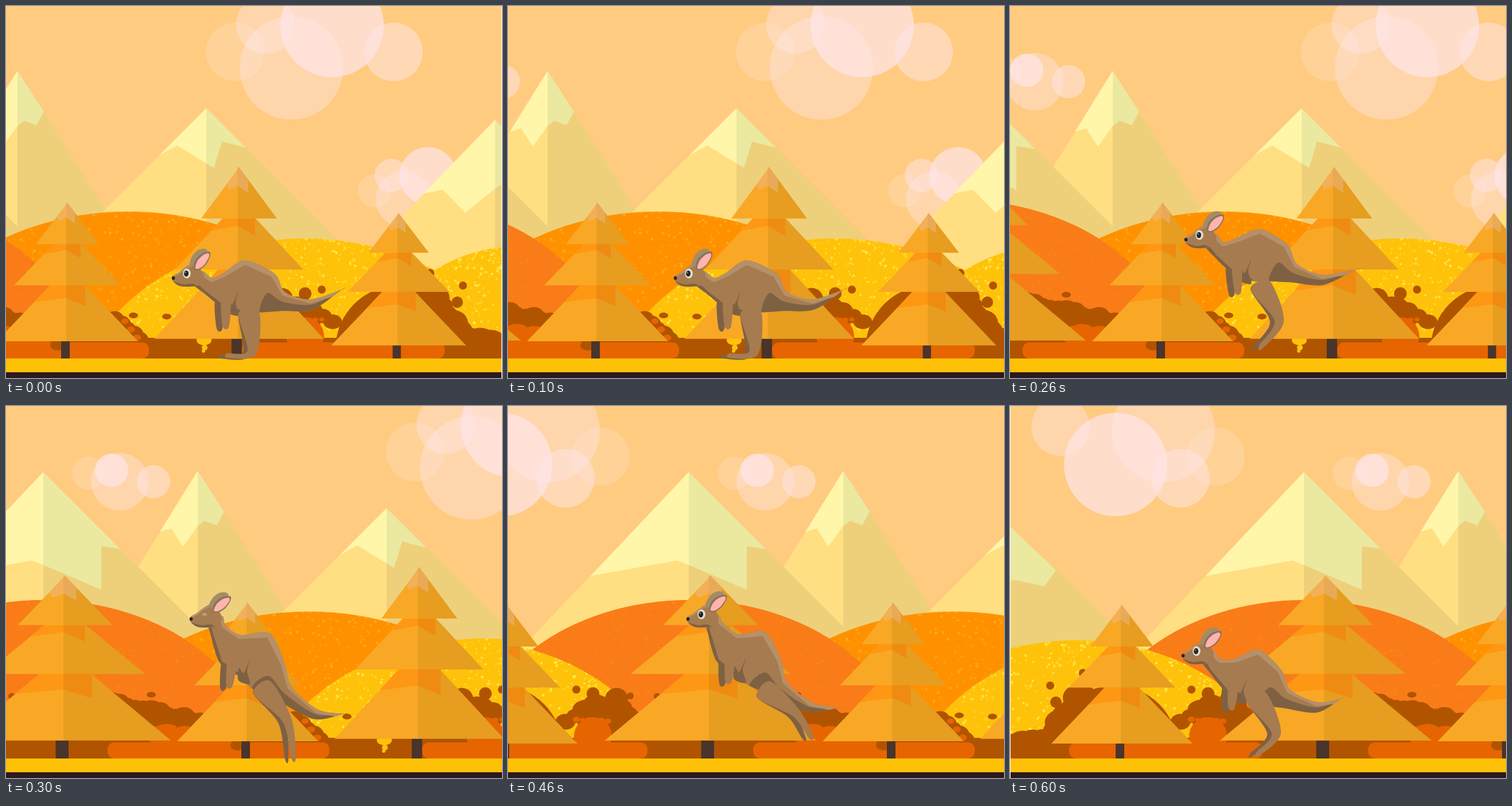
Write an HTML page with a canvas that moves like this. It is 864 px wide and 648 px high and loops after 0.7 s.

```html
<!DOCTYPE html>
<html lang="en">
<head>
<meta charset="utf-8">
<title>Kangaroo run</title>
<style>
html, body { margin: 0; width: 100%; height: 100%; overflow: hidden; background: #fff; }
#stage { position: relative; width: 864px; height: 648px; overflow: hidden; }
#world, #runner { position: absolute; left: 0; top: 0; }
</style>
</head>
<body>
<div id="stage">
  <canvas id="world" width="1624" height="648"></canvas>
  <svg id="runner" width="864" height="648" viewBox="0 0 864 648"></svg>
</div>
<script>
const LOOP = 700;
const SHIFTS = [-761, -712, -602, -447, -197, -158, 0];
const POSE_AT = [0, 0, 1, 2, 3, 4, 5];

const points = text => text.trim().split(/\s+/).map(p => p.split(',').map(Number));
const mix = (a, b, t) => a + (b - a) * t;

let seed = 7;
const random = () => (seed = (seed * 16807) % 2147483647) / 2147483647;

// ---------- scenery ----------
const c = document.getElementById('world').getContext('2d');
const GOLD = '#ffc20a', BROWN = '#b15400', RUST = '#e66500';

function poly(color, text) {
  c.fillStyle = color;
  c.beginPath();
  points(text).forEach(p => c.lineTo(...p));
  c.fill();
}

function dot(color, x, y, rx, ry = rx) {
  c.fillStyle = color;
  c.beginPath();
  c.ellipse(x, y, rx, ry, 0, 0, 7);
  c.fill();
}

const dots = (color, text) => points(text).forEach(p => dot(color, ...p));

function clouds() {
  const fog = a => `rgba(255,230,235,${a})`;
  dots(fog(.22), '1160,80,51 358,88,51 591,117,29 1403,322,29');
  dots(fog(.4), '1258,108,90 1213,32,51 267,43,90 88,36,51 645,132,50 1454,337,49');
  dots(fog(.5), '1436,80,51 297,126,51 704,132,29 1432,295,29');
  dots(fog(.7), '1329,34,90 184,102,90 631,112,29 1496,296,50');
}

// A lit and a shaded half; the snow line runs through the given points.
function mountain(x, y, base, runLeft, runRight, snowLeft, snowRight) {
  const drop = base - y, top = `${x},${y}`, foot = `${x},${base}`;
  poly('#ffdf82', `${top} ${x - drop * runLeft},${base} ${foot}`);
  poly('#eed07b', `${top} ${x + drop * runRight},${base} ${foot}`);
  poly('#fff6aa', `${top} ${snowLeft}`);
  poly('#ebe8a0', `${top} ${snowRight}`);
}

function mountains() {
  mountain(-70, 143, 428, 1, 1.05, '-70,300', '80,286 60,314 8,303 -70,320');
  mountain(781, 113, 414, .62, .635, '715,219 735,213 755,245 781,209', '827,184 814,208 793,200 781,209');
  mountain(512, 115, 444, .95, 1, '341,296 492,269 512,277', '646,249 613,244 613,320 512,277');
  mountain(1110, 178, 418, 1, 1, '1028,260 1059,243 1110,274', '1179,247 1137,236 1123,282 1110,274');
  mountain(1613, 198, 478, .96, 1, '1488,327 1522,320 1561,360 1613,318', '1640,225 1640,300 1613,318');
}

function hill(x, top, rx, ry, color, speck, strength) {
  c.save();
  c.beginPath();
  c.ellipse(x, top + ry, rx, ry, 0, 0, 7);
  c.clip();
  c.fillStyle = color;
  c.fillRect(x - rx, top, rx * 2, 612 - top);
  for (let i = 0; i < 1000; i++) {
    c.globalAlpha = strength * (.3 + random() * .7);
    dot(speck, mix(x - rx, x + rx, random()), top + random() ** 1.3 * 190, .9 + random() * 1.8);
  }
  c.restore();
}

function hills() {
  const gold = (...place) => hill(...place, GOLD, '#ffee58', .9);
  hill(974, 358, 420, 325, '#ff9100', '#ffb424', .8);
  hill(512, 338, 380, 285, '#f97c18', '#ff8f08', .55);
  gold(115, 408, 380, 310);
  gold(1280, 405, 400, 310);
  gold(1650, 419, 285, 310);
}

// Puffs of uneven size strung along a line.
function clump(color, x1, y1, x2, y2, r, n) {
  for (let i = 0; i < n; i++) {
    const t = i / (n - 1), size = r * (.75 + random() * .5);
    dot(color, mix(x1, x2, t), mix(y1, y2, t), size * 1.15, size * .9);
  }
}

function bar(color, x1, x2) {
  c.fillStyle = color;
  c.beginPath();
  c.roundRect(x1, 586, x2 - x1, 28, 12);
  c.fill();
}

// Big round bush with a smaller one beside it.
function thicket() {
  dots(BROWN, '182,597,110 127,465,7 70,487,7 80,516,10 316,494,7 345,501,11 386,511,20 410,505,6 360,548,42');
  clump(BROWN, 122, 508, 80, 566, 24, 5);
  clump(BROWN, 5, 590, 75, 574, 20, 5);
  clump(BROWN, 297, 550, 350, 520, 17, 4);
  clump(BROWN, 395, 525, 425, 560, 20, 4);
  dot(RUST, 345, 575, 33);
  clump(RUST, 316, 546, 371, 549, 5, 6);
}

function bushes() {
  c.fillStyle = BROWN;
  c.fillRect(0, 578, 1624, 40);
  clump(BROWN, 630, 512, 785, 545, 13, 12);
  clump(BROWN, 630, 530, 760, 556, 18, 9);
  clump(BROWN, 950, 544, 1010, 600, 15, 7);
  clump(BROWN, 945, 570, 985, 600, 26, 4);
  dots(BROWN, '700,503,8,5 983,539,8,5 1041,541,8,5 457,506,6');
  thicket();
  c.save();
  c.translate(1627, 0);
  c.scale(-1, 1);
  thicket();
  c.restore();

  bar(RUST, 103, 440);
  bar(RUST, 624, 1010);
  bar(RUST, 1172, 1525);
  clump(RUST, 712, 573, 820, 580, 20, 8);
  clump(RUST, 968, 549, 1000, 592, 6, 4);
  dots(BROWN, '851,591,13,9');
  dots(GOLD, '1106,582,13,9 1107,595,5 1105,601,3');
}

// One fir, drawn at unit size and scaled to its place.
function tree(x, y, sx, sy) {
  const halves = (left, right, lit, dim) => { poly(lit, left); poly(dim, right); };
  const tier = (top, base, half) => halves(
    `0,${top} ${-half},${base} 0,${base}`,
    `-2,${top + 2} 0,${top} ${half},${base} -2,${base}`, '#f9a825', '#e69d20');
  const shadow = (left, right) => halves(left, right, '#fe9714', '#ef8b10');
  const foot = (614 - y) / sy;
  c.save();
  c.translate(x, y);
  c.scale(sx, sy);
  poly('#4a342b', `-11,240 4,240 4,${foot} -11,${foot}`);
  tier(112, 241, 123);
  shadow('-30,143 -2,143 -2,166 -58,173', '-2,143 31,143 31,179 -2,166');
  tier(47, 143.5, 93);
  shadow('-24,72 -2,72 -2,82 -40,89', '-2,72 23,72 23,96 -2,82');
  tier(0, 72, 55);
  halves('0,0 -18,24 -15,32 -2,26 -2,0', '-2,2 0,0 13,17 13,36 -2,26', '#f3b058', '#e9aa57');
  c.restore();
}

function paintWorld() {
  c.fillStyle = '#ffcb80';
  c.fillRect(0, 0, 1624, 648);
  clouds();
  mountains();
  hills();
  bushes();
  tree(195, 347, 1, 1);
  tree(550, 296, 1.5, 1.19);
  tree(868, 343, 1, 1);
  tree(1167, 281, 1.2, 1.24);
  tree(1445, 361, .955, .955);
  c.fillStyle = '#ffc107';
  c.fillRect(0, 614, 1624, 24);
  c.fillStyle = '#2c1820';
  c.fillRect(0, 638, 1624, 10);
  c.clearRect(0, 0, .7, 648);
}

// ---------- kangaroo ----------
const FUR = '#a67b50', FUR_LIGHT = '#b59068', FUR_DARK = '#7e6143';

// Joints: eye, neck, shoulder, middle, rump, tail, tip, hip, heel, toe, hand.
const POSES = [
  '315,466 352,487 378,495 413,489 455,500 532,520 585,494 423,534 428,604 386,609 383,558',
  '330,399 364,424 390,434 428,434 467,447 545,477 602,459 436,487 469,549 437,594 397,498',
  '346,363 369,388 390,423 433,434 457,470 540,537 589,536 446,490 490,548 501,613 389,487',
  '337,363 360,383 382,421 422,432 448,464 525,524 575,526 446,494 502,535 528,577 384,480',
  '323,398 354,427 382,443 418,441 450,465 530,496 575,481 434,492 471,536 456,595 386,498',
  '325,427 357,452 384,469 420,469 453,490 535,525 576,510 430,508 464,570 432,606 386,526'
];
const CLOSED_EYE = 2;
const GIRTH = [13, 15, 30, 46, 36, 17, 9, 0];

const shift = ([x, y], dx, dy) => [x + dx, y + dy];

// Closed curve that runs softly through the given points.
function smooth(p) {
  const n = p.length, k = .15, at = i => p[(i + n) % n];
  let d = `M${p[0]}`;
  for (let i = 0; i < n; i++) {
    const [a, b, e, f] = [at(i - 1), at(i), at(i + 1), at(i + 2)];
    const near = b.map((v, j) => (v + (e[j] - a[j]) * k).toFixed(1));
    const far = e.map((v, j) => (v - (f[j] - b[j]) * k).toFixed(1));
    d += `C${near} ${far} ${e}`;
  }
  return d + 'Z';
}

// Both edges of a band of varying half-width around a chain of joints.
function band(chain, widths) {
  const edge = side => chain.map((p, i) => {
    const a = chain[Math.max(i - 1, 0)], b = chain[Math.min(i + 1, chain.length - 1)];
    const dx = b[0] - a[0], dy = b[1] - a[1], s = side * widths[i] / Math.hypot(dx, dy);
    return shift(p, dy * s, -dx * s);
  });
  const top = edge(1), bottom = edge(-1);
  return { top, bottom, outline: [...top, ...bottom.slice().reverse()] };
}

const shape = (pts, fill) => `<path d="${smooth(pts)}" fill="${fill}"/>`;
const sketch = (text, fill) => shape(points(text), fill);
const limb = (chain, widths, fill) => shape(band(chain, widths).outline, fill);
const oval = (x, y, rx, ry, fill) => `<ellipse cx="${x}" cy="${y}" rx="${rx}" ry="${ry}" fill="${fill}"/>`;
const line = (pts, color, width) =>
  `<polyline points="${pts}" fill="none" stroke="${color}" stroke-width="${width}" stroke-linejoin="round"/>`;

function head(eye, neck, closed) {
  const slope = Math.atan2(neck[1] - eye[1], neck[0] - eye[0]) * 180 / Math.PI;
  const ears = `<g transform="rotate(${(slope - 30) / 2})">` +
    sketch('5,-16 10,-31 20,-41 32,-43 36,-38 26,-33 17,-20 13,-13', '#a48c69') +
    sketch('13,-7 14,-22 25,-34 39,-38 41,-31 34,-16 23,-7', '#8f7355') +
    sketch('15,-9 18,-21 27,-31 37,-35 39,-30 32,-17 22,-9', '#ffb4b0') + '</g>';
  const look = closed ? oval(0, 0, 4.5, 2.5, '#c39a74')
    : oval(0, 0, 6.8, 8.4, '#e6dcc8') + oval(-1, 0, 4, 5.2, '#20262b') + oval(-2.5, -2, 1.2, 1.5, '#8d969b');
  return `<g transform="translate(${eye})">` +
    sketch('-26,8 -23,3 -14,-2 -1,-12 10,-17 20,-12 29,2 28,17 16,22 0,23 -14,21 -23,15', FUR) +
    line('-22,4 -14,0 -1,-10 10,-15', FUR_LIGHT, 3) +
    sketch('-23,14 -14,21 0,23 16,22 24,28 12,18 -4,19 -14,17', FUR_DARK) +
    ears + look + oval(-23.5, 8, 2.8, 3, '#2b2320') + '</g>';
}

function kangaroo(text, i) {
  const [eye, neck, shoulder, middle, rump, tail, tip, hip, heel, toe, hand] = points(text);
  const tailRoot = [mix(rump[0], tail[0], .35), mix(rump[1], tail[1], .35) + 8];
  const spine = [shift(eye, 18, 6), neck, shoulder, middle, rump, tailRoot, tail, tip];
  const body = band(spine, GIRTH);
  const arm = [shift(shoulder, 5, 16), hand];
  const crease = points('-8,8 -13,28 -8,50 -28,44 -27,22 -19,31').map(p => shift(middle, ...p));
  const underTail = [...spine.slice(4), ...body.bottom.slice(4).reverse()];
  return `<g class="pose"><clipPath id="body${i}"><path d="${smooth(body.outline)}"/></clipPath>` +
    limb(arm.map(p => shift(p, -11, 4)), [8, 5], FUR_DARK) +
    limb([hip, shift(heel, -9, 2), shift(toe, -12, 2)], [18, 7, 3], FUR_DARK) +
    shape(body.outline, FUR) +
    `<g clip-path="url(#body${i})">` + shape(underTail, FUR_DARK) +
    line(body.top, FUR_LIGHT, 14) + line(body.bottom.slice(0, 4), FUR_DARK, 9) + '</g>' +
    shape(crease, FUR_DARK) +
    limb([hip, heel, toe], [18, 8, 4], FUR) +
    limb(arm, [8, 5.5], FUR) +
    head(eye, neck, i === CLOSED_EYE) + '</g>';
}

// ---------- motion ----------
function play(el, frames) {
  const keys = frames.map((frame, i) => ({ ...frame, offset: i / frames.length, easing: 'step-end' }));
  keys.push({ ...frames[frames.length - 1], offset: 1 });
  el.animate(keys, { duration: LOOP, iterations: Infinity });
}

paintWorld();
const runner = document.getElementById('runner');
runner.innerHTML = POSES.map(kangaroo).join('');
play(document.getElementById('world'), SHIFTS.map(x => ({ transform: `translateX(${x}px)` })));
runner.querySelectorAll('.pose').forEach((el, i) =>
  play(el, POSE_AT.map(p => ({ opacity: p === i ? 1 : 0 }))));
</script>
</body>
</html>
```
